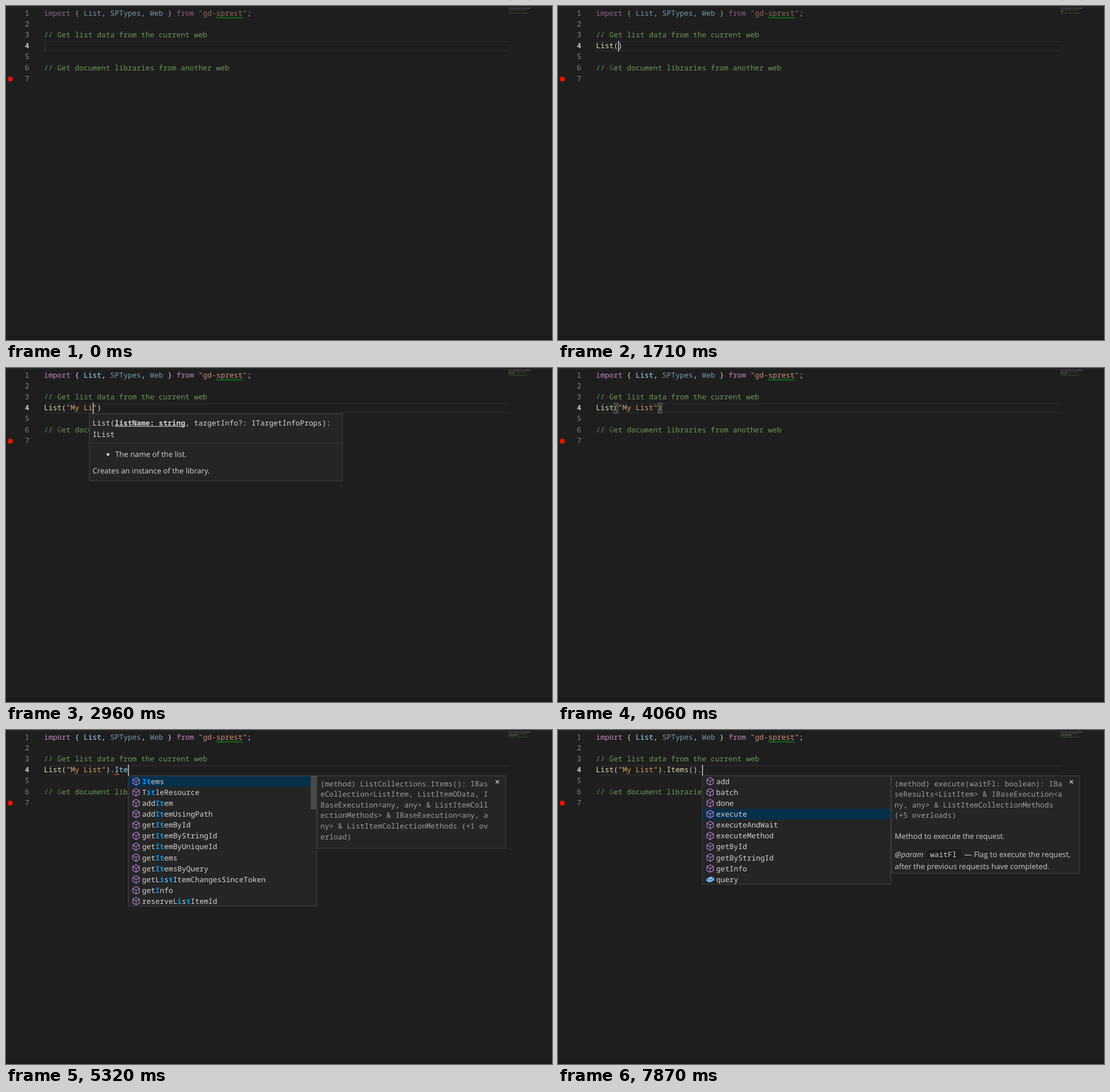
Write an HTML page with a canvas that moves like this. It is 956x586 px and loops after 8 s.

```html
<!DOCTYPE html>
<html lang="en">
<head>
<meta charset="utf-8">
<title>Editor typing</title>
<style>
  html, body { margin: 0; width: 100%; height: 100%; overflow: hidden; background: #1e1e1e; }
  canvas { display: block; }
</style>
</head>
<body>
<canvas id="stage" width="956" height="586"></canvas>
<script>
const ctx = document.getElementById('stage').getContext('2d');
const LOOP = 8000;
const CW = 7.73, X0 = 66.5, LINE = 19.1;
const MONO = '12.88px "Noto Sans Mono", monospace';
const UI = '13.2px "Open Sans", "Noto Sans", sans-serif';
const C = {
  bg: '#1e1e1e', panel: '#252526', edge: '#454545', text: '#d4d4d4', grey: '#9d9d9d',
  keyword: '#c586c0', name: '#9cdcfe', string: '#ce9178', call: '#dcdcaa',
  literal: '#d8a066', comment: '#6a9955', match: '#0097fb'
};

const colX = col => X0 + col * CW;
const baseY = line => 17 + LINE * (line - 1);

const IMPORT = [
  ['import', 'keyword'], [' { ', 'text'], ['List', 'name'], [', ', 'text'],
  ['SPTypes', 'name', 1], [', ', 'text'], ['Web', 'name', 1], [' } ', 'text'],
  ['from', 'keyword'], [' ', 'text'], ['"gd-sprest"', 'string'], [';', 'text']
];
const NOTES = { 3: '// Get list data from the current web', 6: '// Get document libraries from another web' };

const LISTS = {
  globals: {
    rows: ['List', 'length', 'localStorage', 'location', 'locationbar', 'clientInformation',
      'HTMLLinkElement', 'HTMLLIElement', 'EventListener', 'MediaList', 'MediaQueryList', 'NodeList'],
    bar: 1, sel: 0, height: 73,
    detail: ['(alias) List(listName: string, targetI', 'nfo?: ITargetInfoProps): IList', 'import List']
  },
  members: {
    rows: ['ContentTypes', 'CreatablesInfo', 'DefaultView', 'DescriptionResource', 'EventReceivers', 'Fields',
      'FirstUniqueAncestorSecurableObject', 'Forms', 'Items', 'ParentWeb', 'RoleAssignments', 'RootFolder'],
    bar: 1, sel: 0, height: 73,
    detail: ['(method) ListCollections.ContentTypes(', '): IBaseCollection<ContentType> (+1 ov', 'erload)']
  },
  items: {
    rows: ['Items', 'TitleResource', 'addItem', 'addItemUsingPath', 'getItemById', 'getItemByStringId',
      'getItemByUniqueId', 'getItems', 'getItemsByQuery', 'getListItemChangesSinceToken', 'getInfo', 'reserveListItemId'],
    bar: 1, sel: 0, height: 128,
    detail: ['(method) ListCollections.Items(): IBas', 'eCollection<ListItem, ListItemOData, I',
      'BaseExecution<any, any> & ListItemColl', 'ectionMethods> & IBaseExecution<any, a',
      'ny> & ListItemCollectionMethods (+1 ov', 'erload)']
  },
  results: {
    rows: ['add', 'batch', 'done', 'execute', 'executeAndWait', 'executeMethod', 'getById',
      'getByStringId', 'getInfo', 'query'],
    sel: 3, height: 172, field: 9,
    detail: ['(method) execute(waitFl: boolean): IBa', 'seResults<ListItem> & IBaseExecution<a',
      'ny, any> & ListItemCollectionMethods', '(+5 overloads)'],
    extra: executeNotes
  }
};

// Each entry patches the editor state from its time on; "|" is the caret.
const EVENTS = [
  [0, { code: '|', on: 0 }],
  [460, { on: 1 }],
  [690, { code: 'L|' }],
  [860, { list: 'globals', at: 1, q: 'l', detail: 0 }],
  [930, { code: 'Li|', detail: 1 }],
  [1000, { at: 2, q: 'li' }],
  [1090, { code: 'Lis|' }],
  [1160, { at: 3, q: 'lis' }],
  [1410, { code: 'List|' }],
  [1480, { at: 4, q: 'list', dim: 1 }],
  [1710, { code: 'List(|)', list: 0 }],
  [1800, { box: [4, 5], used: 1 }],
  [1870, { sig: listSig, at: 5 }],
  [1950, { code: 'List("|")', box: 0 }],
  [2030, { at: 6 }],
  [2200, { code: 'List("M|")' }],
  [2270, { at: 7 }],
  [2500, { code: 'List("My|")' }],
  [2570, { code: 'List("My |")', at: 8 }],
  [2650, { at: 9 }],
  [2850, { code: 'List("My L|")' }],
  [2910, { at: 10 }],
  [2960, { code: 'List("My Li|")' }],
  [3030, { at: 11 }],
  [3110, { code: 'List("My Lis|")' }],
  [3190, { code: 'List("My List|")', at: 12 }],
  [3280, { at: 13 }],
  [3420, { code: 'List("My List"|)', box: [4, 14] }],
  [3490, { at: 14 }],
  [3560, { code: 'List("My List")|' }],
  [3660, { sig: 0 }],
  [4060, { on: 0 }],
  [4150, { code: 'List("My List").|', on: 1, box: 0 }],
  [4220, { list: 'members', at: 16, q: '', detail: 0 }],
  [4310, { detail: 1 }],
  [4550, { code: 'List("My List").I|' }],
  [4630, { list: 'items', at: 17, q: 'i' }],
  [4790, { wave: [15, 16] }],
  [5100, { code: 'List("My List").It|' }],
  [5170, { at: 18, q: 'it' }],
  [5240, { wave: [16, 17] }],
  [5320, { code: 'List("My List").Ite|', at: 19 }],
  [5400, { q: 'ite' }],
  [5850, { code: 'List("My List").Items|', list: 0 }],
  [5880, { wave: [16, 21] }],
  [6250, { code: 'List("My List").Items(|)' }],
  [6320, { box: [21, 22] }],
  [6400, { wave: 0 }],
  [6550, { sig: itemsSig, at: 22 }],
  [6880, { on: 0 }],
  [7040, { code: 'List("My List").Items()|', on: 1 }],
  [7110, { at: 23 }],
  [7190, { sig: 0 }],
  [7580, { on: 0 }],
  [7790, { code: 'List("My List").Items().|', on: 1, box: 0 }],
  [7870, { list: 'results', at: 24, q: '', detail: 1 }]
];

const stateAt = t => Object.assign({}, ...EVENTS.filter(e => e[0] <= t).map(e => e[1]));

function rect(x, y, w, h, color) {
  ctx.fillStyle = color;
  ctx.fillRect(x, y, w, h);
}

function text(s, x, y, color = C.text, font = MONO) {
  ctx.font = font;
  ctx.fillStyle = color;
  ctx.fillText(s, x, y);
}

function path(points, color, width = 1, close = false) {
  ctx.beginPath();
  points.forEach(([x, y]) => ctx.lineTo(x, y));
  if (close) ctx.closePath();
  ctx.strokeStyle = color;
  ctx.lineWidth = width;
  ctx.stroke();
}

function dot(x, y, r, color) {
  ctx.beginPath();
  ctx.arc(x, y, r, 0, Math.PI * 2);
  ctx.fillStyle = color;
  ctx.fill();
}

function panel(x, y, w, h) {
  rect(x, y, w, h, C.edge);
  rect(x + 1, y + 1, w - 2, h - 2, C.panel);
}

function wave(from, to, y, color) {
  const points = [];
  for (let x = colX(from); x <= colX(to); x += 0.5) {
    points.push([x, y + 1.2 * Math.sin((x - X0) * Math.PI * 2 / 4.6)]);
  }
  path(points, color, 1.1);
}

function cube(x, y) {
  const corner = (k, r = 6.6) => [x + r * Math.sin(k * Math.PI / 3), y - r * Math.cos(k * Math.PI / 3)];
  path([0, 1, 2, 3, 4, 5].map(k => corner(k)), '#b180d7', 1.2, true);
  path([corner(5), [x, y], corner(1)], '#b180d7', 1.1);
  path([[x, y], corner(3)], '#b180d7', 1.1);
}

function brick(x, y) {
  ctx.beginPath();
  [[-6.5, -1], [1, -5], [7, -2.5], [7, 1.5], [-1, 5.5], [-6.5, 3]].forEach(([a, b]) => ctx.lineTo(x + a, y + b));
  ctx.fillStyle = '#75beff';
  ctx.fill();
  path([[x - 6, y - 1], [x - 1, y + 1.3], [x + 6.5, y - 2.3]], C.panel, 0.8);
}

function cross(x, y) {
  path([[x - 2.7, y - 2.7], [x + 2.7, y + 2.7]], '#c5c5c5', 1.4);
  path([[x - 2.7, y + 2.7], [x + 2.7, y - 2.7]], '#c5c5c5', 1.4);
}

// Draws a suggestion, marking the letters of the query in order.
function suggestion(name, query, x, y) {
  let hit = 0;
  [...name].forEach((ch, i) => {
    const on = hit < query.length && ch.toLowerCase() === query[hit];
    if (on) hit++;
    text(ch, x + i * CW, y, on ? C.match : C.text, on ? 'bold ' + MONO : MONO);
  });
}

function suggestList({ list, at, q, detail }) {
  const { rows, sel, bar, field, height, detail: lines, extra } = LISTS[list];
  const x = colX(at) + 0.2, w = 331;
  panel(x, 80, w, rows.length * LINE + 0.2);
  rect(x + 1, 81 + sel * LINE, w - (bar ? 12 : 2), LINE - 0.4, '#062f4a');
  if (bar) rect(x + w - 11, 81, 10, 58, '#4b4b4c');
  rows.forEach((name, i) => {
    const y = 90.2 + i * LINE;
    (i === field ? brick : cube)(x + 14.2, y);
    suggestion(name, q, x + 24.7, y + 4.6);
  });
  if (!detail) return;
  const dx = x + w - 0.3;
  panel(dx, 80, w, height);
  lines.forEach((s, i) => text(s, dx + 6.2, 98.6 + i * 18.6, C.grey));
  cross(dx + 316, 91);
  if (extra) extra(dx + 6.7);
}

function executeNotes(x) {
  text('Method to execute the request.', x, 190.5, '#ccc', UI);
  text('@param', x, 222.5, '#ccc', 'italic ' + UI);
  ctx.beginPath();
  ctx.roundRect(x + 57, 210, 61, 17, 3);
  ctx.fillStyle = '#1c1c1c';
  ctx.fill();
  text('waitFl', x + 62, 222.5, '#ccc');
  text('— Flag to execute the request,', x + 122, 222.5, '#ccc', UI);
  text('after the previous requests have completed.', x, 243.5, '#ccc', UI);
}

function listSig(col) {
  const x = colX(col) + 2, tx = x + 5.7;
  panel(x - 0.3, 80, 444, 118.5);
  text('List(', tx, 100.6);
  text('listName: string', tx + 5 * CW, 100.6, C.text, 'bold ' + MONO);
  rect(tx + 5 * CW, 102, 16 * CW, 1, C.text);
  text(', targetInfo?: ITargetInfoProps):', tx + 21 * CW, 100.6);
  text('IList', tx, 121);
  rect(x, 131, 443, 1, '#39393a');
  dot(x + 32.7, 151.7, 2.4, C.text);
  text('The name of the list.', x + 45.5, 155.8, C.text, UI);
  text('Creates an instance of the library.', tx, 185, C.text, UI);
}

function itemsSig(col) {
  const x = colX(col) - 0.3, mid = x + 11;
  panel(x, -40, 470.5, 103.5);
  rect(x + 27, 0, 1, 61, '#39393a');
  path([[mid - 3.5, 31], [mid, 27.5], [mid + 3.5, 31]], C.text, 1.3);
  path([[mid - 3.5, 51.5], [mid, 55], [mid + 3.5, 51.5]], C.text, 1.3);
  text('1/2', x + 2, 48.5, '#8c8c8c', UI);
  ['Items(): IBaseCollection<ListItem, ListItemOData,',
    'IBaseExecution<any, any> & ListItemCollectionMethods> &',
    'IBaseExecution<any, any> & ListItemCollectionMethods'
  ].forEach((s, i) => text(s, x + 33.6, 10 + i * 20.7));
}

function codeLine(code) {
  for (const m of code.matchAll(/"[^"]*"|\w+|[^\w"]+/g)) {
    const s = m[0];
    const color = s[0] === '"' ? C.literal : !/\w/.test(s) ? C.text
      : code[m.index + s.length] === '(' ? C.call : C.name;
    text(s, colX(m.index), baseY(4), color);
  }
}

function importLine(used) {
  let col = 0;
  for (const [s, kind, spare] of IMPORT) {
    ctx.globalAlpha = used && !spare ? 1 : 0.667;
    text(s, colX(col), baseY(1), C[kind]);
    col += s.length;
  }
  ctx.globalAlpha = 1;
}

function miniLine(s, line, color) {
  [...s].forEach((ch, i) => {
    if (ch !== ' ') rect(880 + i * 0.82, 3.4 + (line - 1) * 1.65, 0.7, 1.2, color);
  });
}

function minimap(code, used) {
  ctx.globalAlpha = 0.5;
  miniLine(IMPORT.map(p => p[0]).join(''), 1, used ? '#d0c8d0' : '#b0a8b0');
  for (const n in NOTES) miniLine(NOTES[n], n, C.comment);
  miniLine(code, 4, C.call);
  ctx.globalAlpha = 1;
}

function draw(t) {
  const s = stateAt(t);
  const caret = s.code.indexOf('|');
  const code = s.code.replace('|', '');

  rect(0, 0, 956, 586, C.bg);
  rect(0, 0, 956, 2.5, '#252526');
  rect(0, 579, 956, 7, '#1b1b1c');

  rect(67, 61.7, 813, 1.5, '#2a2a2a');
  rect(67, 77.7, 813, 1.5, '#2a2a2a');
  rect(67, 61.7, 1.5, 17.5, '#2a2a2a');

  for (let n = 1; n <= 7; n++) {
    const now = n === 4;
    text(n, 33, baseY(n), now ? '#c6c6c6' : '#858585', now ? 'bold ' + MONO : MONO);
  }
  dot(7.5, 128.2, 4.5, '#e51400');

  importLine(s.used);
  wave(39, 45, 20.6, '#0a8a1a');
  for (const n in NOTES) text(NOTES[n], X0, baseY(+n), C.comment);
  if (s.dim) {
    rect(colX(3), 100, CW, 15, C.bg);
    text('G', colX(3), baseY(6), '#5c6156');
  }

  for (const col of s.box || []) {
    rect(colX(col) + 0.2, 61.5, CW - 0.2, 18, '#888');
    rect(colX(col) + 1.1, 62.4, CW - 2, 16.2, '#1b261b');
  }
  codeLine(code);
  if (s.wave) wave(...s.wave, 77.5, '#f44747');
  if (s.on) rect(colX(caret) + 0.3, 61, 1.5, 19, '#d0d0ce');
  minimap(code, s.used);

  if (s.list) suggestList(s);
  if (s.sig) s.sig(s.at);
}

ctx.textRendering = 'geometricPrecision';
const start = performance.now();
function tick() {
  draw((performance.now() - start) % LOOP);
  requestAnimationFrame(tick);
}
tick();
</script>
</body>
</html>
```
